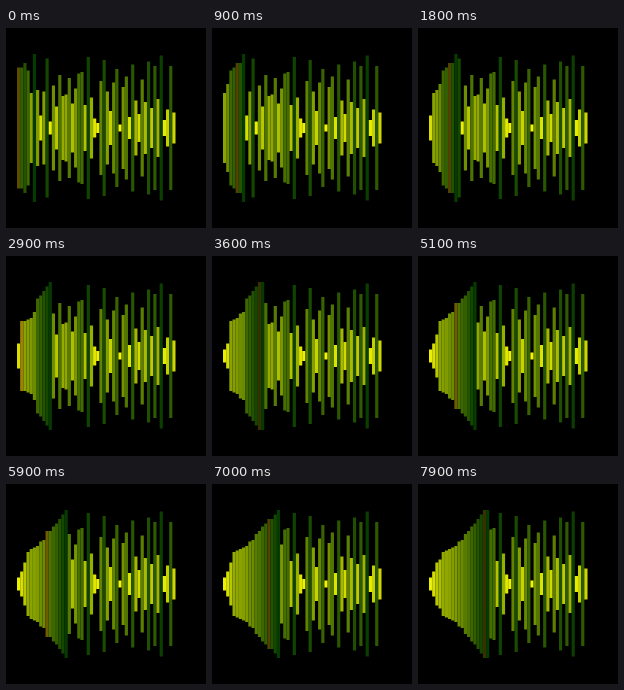
An HTML page with a canvas for the animation above (8000 ms loop, 200x200 px).

```html
<!DOCTYPE html>
<html>
<head>
<meta charset="utf-8">
<style>
html, body { margin: 0; width: 100%; height: 100%; overflow: hidden; background: #000; }
canvas { display: block; width: 200px; height: 200px; }
</style>
</head>
<body>
<canvas id="stage" width="200" height="200"></canvas>
<script>
const ctx = document.getElementById('stage').getContext('2d');
const LOOP = 8000, TICK = 100;
const LEFT = 11, PITCH = 3.17, MID = 100, UNIT = 1.5;
const FIRST_STEP = 1.6, STEPS_PER_TICK = 1.47;

// The shuffled values to sort; everything else follows from them.
const START = [
  40, 29, 43, 38, 23, 49, 25, 8, 24, 46, 4, 28, 14, 35, 21, 22, 33,
  16, 26, 36, 37, 15, 47, 20, 6, 3, 31, 45, 24, 11, 30, 39, 2, 27,
  34, 7, 42, 18, 9, 32, 17, 44, 13, 41, 19, 48, 5, 12, 41, 10
];

// Insertion sort, pausing after every shift and placement.
function* sortSteps(a) {
  yield -1;
  for (let i = 1; i < a.length; i++) {
    const key = a[i];
    let hole = i;
    while (hole > 0 && a[hole - 1] > key) {
      a[hole] = a[hole - 1];
      yield --hole;
    }
    a[hole] = key;
    yield hole;
  }
}

function stateAt(count) {
  const bars = START.slice();
  const sorter = sortSteps(bars);
  let mark = sorter.next().value;
  for (let n = 0; n < count; n++) mark = sorter.next().value;
  return { bars, mark };
}

// Yellow for short bars to dark green for tall ones, with a red tint on the mark.
function barColor(v, marked) {
  const tint = marked ? 0.2 : 0;
  const r = 255 - 5.1 * v, g = 255 - 4 * v;
  return `rgb(${Math.round(r + (255 - r) * tint)},${Math.round(g * (1 - tint))},0)`;
}

function draw(tick) {
  const { bars, mark } = stateAt(Math.floor(FIRST_STEP + STEPS_PER_TICK * tick));
  ctx.fillStyle = '#000';
  ctx.fillRect(0, 0, 200, 200);
  bars.forEach((v, i) => {
    const half = v * UNIT + 0.5;
    ctx.fillStyle = barColor(v, i === mark);
    ctx.fillRect(LEFT + i * PITCH, MID - half, PITCH, 2 * half);
  });
}

let begin = null;
function loop(now) {
  if (begin === null) begin = now;
  draw(Math.floor(((now - begin) % LOOP) / TICK));
  requestAnimationFrame(loop);
}
draw(0);
requestAnimationFrame(loop);
</script>
</body>
</html>
```
